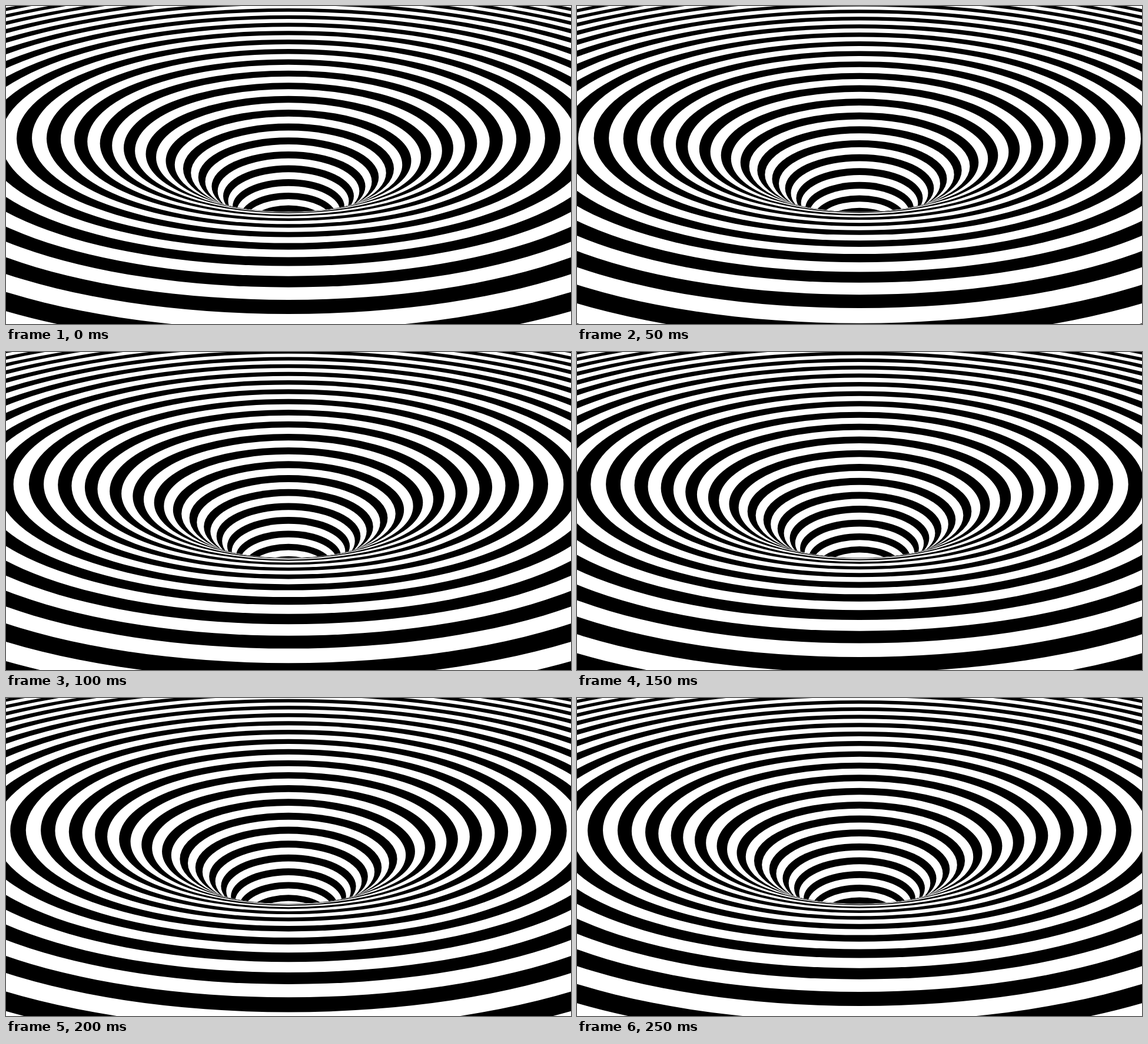
An HTML page with a canvas that plays this animation: 960x540 px, repeating every 300 ms.

```html
<!DOCTYPE html>
<html lang="en">
<head>
<meta charset="utf-8">
<title>Striped funnel</title>
<style>
  html, body { margin: 0; width: 100%; height: 100%; overflow: hidden; background: #fff; }
  canvas { display: block; }
</style>
</head>
<body>
<canvas id="stage" width="960" height="540"></canvas>
<script>
const ctx = document.getElementById('stage').getContext('2d');

// Profile of the funnel as seen by the camera, one knot every GAP stripes.
const FIRST = -24, GAP = 4;
const top_ = [-61, -49, -34.5, -17, 4, 28.5, 57, 90.5, 130.3, 176, 223.3, 270.5, 317, 359, 397];
const bottom = [1330, 1010, 800, 645, 523, 441.5, 392.5, 365, 352, 350, 358, 375, 399, 428, 460];
const halfWidth = [1470, 1225, 1025, 862, 712, 577, 462, 364, 280, 208.5, 153.3, 111, 81.5, 60.5, 46];

// Catmull-Rom curve through the knots
function curve(knots, u) {
  const s = (u - FIRST) / GAP, i = Math.floor(s), t = s - i;
  const at = n => knots[Math.max(0, Math.min(knots.length - 1, n))];
  const [a, b, c, d] = [at(i - 1), at(i), at(i + 1), at(i + 2)];
  return b + t / 2 * (c - a + t * (2 * a - 5 * b + 4 * c - d + t * (3 * (b - c) + d - a)));
}

function ring(u) {
  const y1 = curve(top_, u), y2 = curve(bottom, u);
  ctx.beginPath();
  ctx.ellipse(480, (y1 + y2) / 2, curve(halfWidth, u), (y2 - y1) / 2, 0, 0, 2 * Math.PI);
}

// Discs from the outside in; each deep one is hidden behind the near lip.
function draw(shift) {
  ctx.fillStyle = '#fff';
  ctx.fillRect(0, 0, 960, 540);
  ctx.save();
  for (let k = FIRST; k < 30; k++) {
    ring(k + shift);
    ctx.fillStyle = k % 2 ? '#fff' : '#000';
    ctx.fill();
    if (k > 3) ctx.clip();
  }
  ctx.restore();
}

// Two stripes inward in five steps, with the first pose held twice as long.
let shown = -1;
function tick() {
  const step = Math.floor(performance.now() % 300 / 50) % 5;
  if (step !== shown) draw(0.4 * (shown = step));
  requestAnimationFrame(tick);
}
tick();
</script>
</body>
</html>
```
